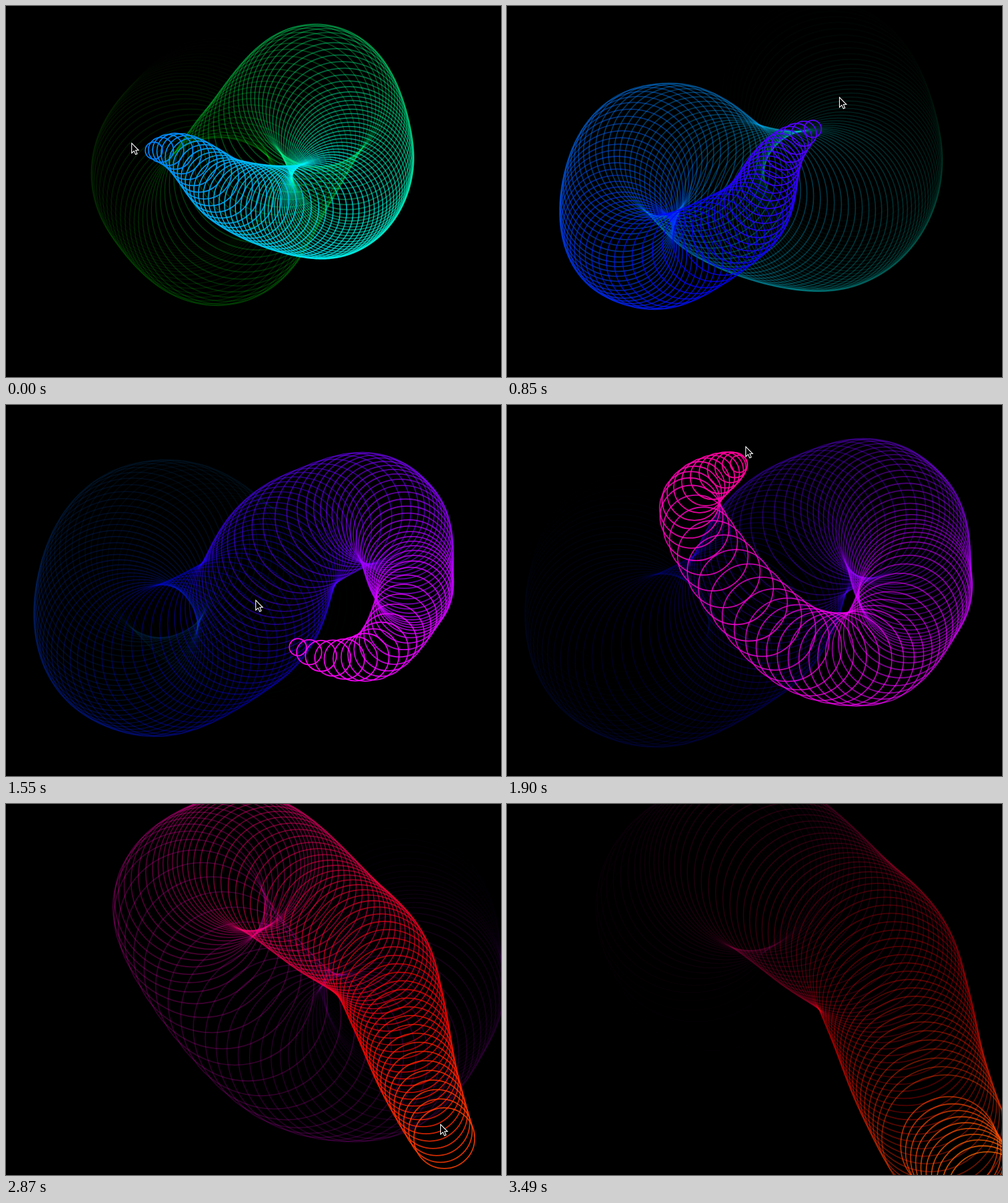
Animation of 766x575 px, one loop 3590 ms. Source, as an HTML page with a canvas:

```html
<!DOCTYPE html>
<html lang="en">
<head>
<meta charset="utf-8">
<title>Circle trail</title>
<style>
  html, body { margin: 0; width: 100%; height: 100%; overflow: hidden; background: #000; }
  canvas { display: block; }
</style>
</head>
<body>
<canvas id="stage" width="766" height="575"></canvas>
<script>
const ctx = document.getElementById('stage').getContext('2d');
const LOOP = 3590;
const LIFE = 1900;
const GROWTH = 3.46;          // radius = GROWTH * sqrt(age)
const EMIT = 1000 / 60;
const REST = 2693;            // the pointer stops here for a while
const REST_LENGTH = 318;

// Turning points of the pointer: moving time, x, y
const path = [
  [-1900, 335, 190], [-1580, 274, 275], [-1410, 330, 334], [-1220, 400, 240],
  [-1037, 475, 140], [-786, 534, 235], [-482, 487, 316], [-225, 347, 289],
  [-45, 249, 223], [-15, 229, 224], [157, 173, 308], [304, 186, 377],
  [403, 240, 396], [545, 355, 342], [834, 472, 191], [900, 537, 163],
  [1020, 600, 180], [1175, 625, 258], [1300, 627, 305], [1430, 560, 390],
  [1536, 451, 375], [1708, 284, 168], [1850, 345, 97], [1950, 385, 92],
  [2148, 500, 178], [2326, 583, 256], [2400, 602, 308], [2579, 643, 437],
  [REST, 681, 523], [2856, 745, 603]
];
const last = path.length - 1;

const chord = (i, axis) =>
  (path[i + 1][axis] - path[i][axis]) / (path[i + 1][0] - path[i][0]);

function slope(i, axis) {
  if (i === 0) return chord(0, axis);
  if (i === last) return chord(last - 1, axis);
  const before = path[i][0] - path[i - 1][0];
  const after = path[i + 1][0] - path[i][0];
  return (chord(i - 1, axis) * after + chord(i, axis) * before) / (before + after);
}

// Smooth curve through the turning points
function pointer(t) {
  t = Math.max(path[0][0], Math.min(t, path[last][0]));
  let i = 0;
  while (i < last - 1 && path[i + 1][0] < t) i++;
  const a = path[i], b = path[i + 1];
  const d = b[0] - a[0];
  const u = (t - a[0]) / d;
  const v = 1 - u;
  return [1, 2].map(k =>
    v * v * (1 + 2 * u) * a[k] + u * u * (1 + 2 * v) * b[k] +
    d * u * v * (v * slope(i, k) - u * slope(i + 1, k)));
}

// Clock time to moving time
const moving = t => t < REST ? t : Math.max(REST, t - REST_LENGTH);

const circles = [];
for (let m = 2 - 114 * EMIT; m <= path[last][0]; m += EMIT) {
  const [x, y] = pointer(m);
  circles.push({ born: m > REST ? m + REST_LENGTH : m, x, y, hue: 210 + 0.0615 * m });
}

// The picture is refreshed every 88 ms, on a 10 ms clock
const times = [0];
for (let k = 0; k < 40; k++) times.push(50 + 10 * Math.floor(8.8 * k + 0.85));

const arrow = new Path2D('M.5 .5V16L4.1 12.6L6.5 18L9 17L6.7 11.5H11.2Z');

function drawCursor(t) {
  const [x, y] = pointer(moving(t + 35));
  ctx.save();
  ctx.translate(Math.round(x - 9), Math.round(y - 27));
  ctx.fillStyle = '#000';
  ctx.strokeStyle = '#fff';
  ctx.lineWidth = 1.1;
  ctx.fill(arrow);
  ctx.stroke(arrow);
  ctx.restore();
}

function draw(t) {
  ctx.fillStyle = '#000';
  ctx.fillRect(0, 0, 766, 575);
  ctx.lineWidth = 1.8;
  for (const c of circles) {
    const age = t - c.born;
    if (age < 11 || age >= LIFE) continue;
    const alpha = (1 - age / LIFE) ** 1.5;
    ctx.strokeStyle = `hsla(${c.hue % 360}, 100%, 50%, ${alpha})`;
    ctx.beginPath();
    ctx.arc(c.x, c.y, GROWTH * Math.sqrt(age), 0, 2 * Math.PI);
    ctx.stroke();
  }
  drawCursor(t);
}

const start = performance.now();
let shown = -1;

function tick() {
  const now = (performance.now() - start) % LOOP;
  let i = times.length - 1;
  while (times[i] > now) i--;
  if (i !== shown) draw(times[shown = i]);
  requestAnimationFrame(tick);
}
tick();
</script>
</body>
</html>
```
